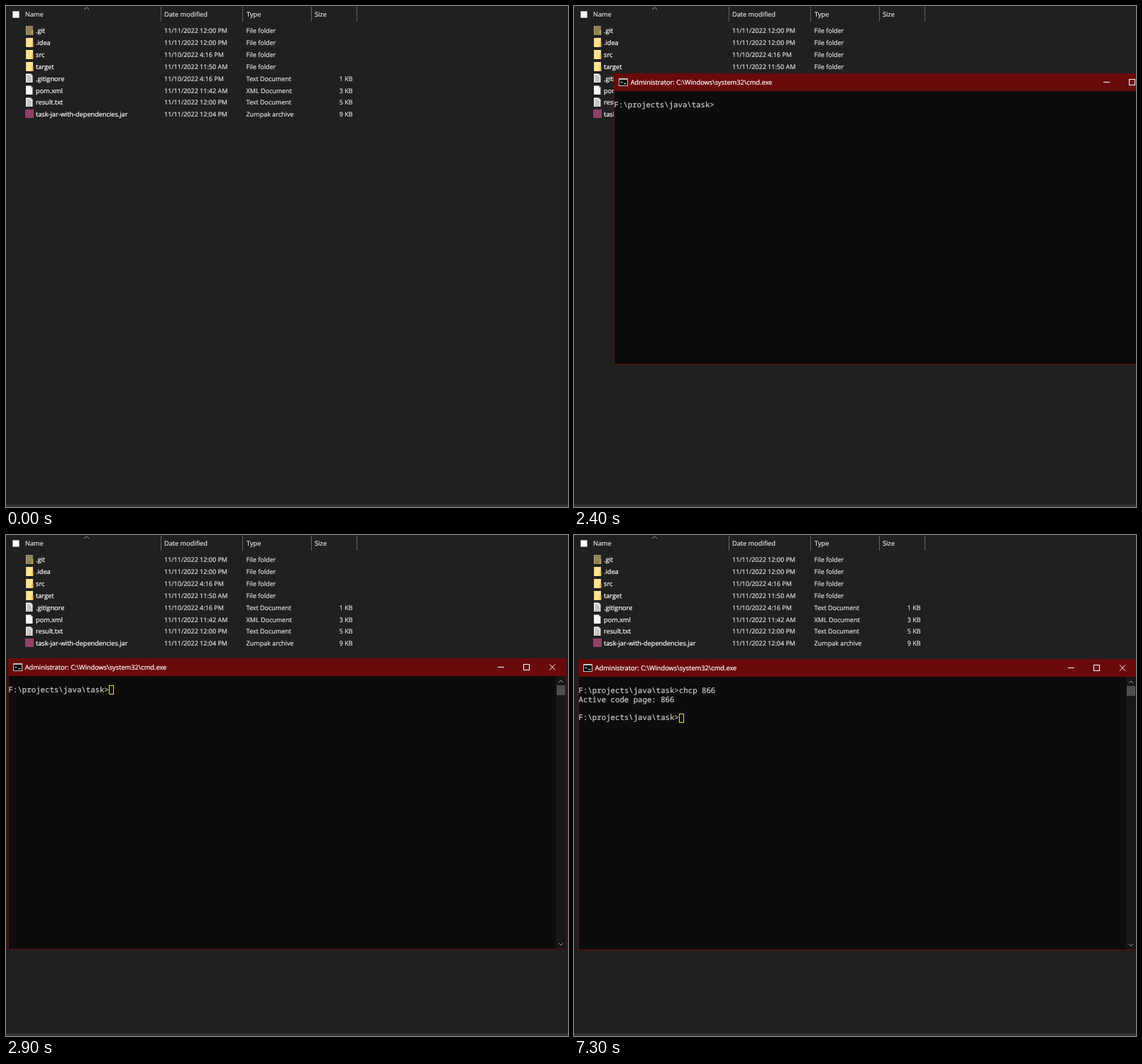
Animation of 792 by 707 pixels, one loop 8000 ms. Source, as an HTML page with a canvas:

```html
<!DOCTYPE html>
<html lang="en">
<head>
<meta charset="utf-8">
<title>Console over a file list</title>
<style>
  html, body { margin: 0; width: 100%; height: 100%; overflow: hidden; background: #202020; }
  canvas { display: block; }
</style>
</head>
<body>
<canvas id="stage" width="792" height="707"></canvas>
<script>
const ctx = document.getElementById('stage').getContext('2d');
const LOOP = 8000;
const UI = '"Open Sans", "Noto Sans", sans-serif';
const MONO = '"Noto Sans Mono", "DejaVu Sans Mono", monospace';
const CELL_W = 6.43, CELL_H = 12.86;
const PROMPT = 'F:\\projects\\java\\task>';
const COMMAND = 'chcp 866';

const FILES = [
  ['.git', '11/11/2022 12:00 PM', 'File folder', '', 'hidden'],
  ['.idea', '11/11/2022 12:00 PM', 'File folder', '', 'folder'],
  ['src', '11/10/2022 4:16 PM', 'File folder', '', 'folder'],
  ['target', '11/11/2022 11:50 AM', 'File folder', '', 'folder'],
  ['.gitignore', '11/10/2022 4:16 PM', 'Text Document', '1 KB', 'text'],
  ['pom.xml', '11/11/2022 11:42 AM', 'XML Document', '3 KB', 'page'],
  ['result.txt', '11/11/2022 12:00 PM', 'Text Document', '5 KB', 'text'],
  ['task-jar-with-dependencies.jar', '11/11/2022 12:04 PM', 'Zumpak archive', '9 KB', 'archive']
];

// Console position: [time, x, y]
const MOVES = [
  [1500, 86, 65], [2400, 56, 95], [2500, 24, 131], [2600, 0, 161], [2700, 1, 169],
  [2800, 2, 173], [2900, 3, 174], [3100, 5, 175], [3200, 6, 175]
];
const KEY_TIMES = [4500, 4700, 4800, 5000, 5300, 6600, 6700, 6800];
const CURSOR_ON = [[1500, 2400], [2900, 3400], [3900, 4300], [5000, 5300],
                   [6300, 6600], [6900, 7200], [7300, LOOP]];

const within = (t, a, b) => t >= a && t < b;

function rect(x, y, w, h, color) {
  ctx.fillStyle = color;
  ctx.fillRect(x, y, w, h);
}

function frame(x, y, w, h, color) {
  ctx.strokeStyle = color;
  ctx.lineWidth = 1;
  ctx.strokeRect(x + 0.5, y + 0.5, w - 1, h - 1);
}

function path(points, color, fill) {
  ctx.beginPath();
  points.forEach(([x, y]) => ctx.lineTo(x, y));
  ctx.lineWidth = 1;
  if (fill) {
    ctx.fillStyle = color;
    ctx.fill();
  } else {
    ctx.strokeStyle = color;
    ctx.stroke();
  }
}

// The thin outline gives small text the weight of hinted screen type
function text(str, x, y, size, color, family = UI, align = 'left') {
  ctx.font = `${size}px ${family}`;
  ctx.textAlign = align;
  ctx.fillStyle = ctx.strokeStyle = color;
  ctx.lineWidth = 0.22;
  ctx.fillText(str, x, y);
  ctx.strokeText(str, x, y);
}

function checkbox(x, y) {
  rect(x + 0.4, y + 0.4, 9.2, 9.2, '#fff');
}

function folderIcon(y, dim) {
  ctx.globalAlpha = dim ? 0.5 : 1;
  rect(28, y - 7, 10, 13, '#ffe394');
  rect(28, y - 7, 1, 13, '#f3cd68');
  rect(36, y - 1, 2.5, 7, '#e9bd55');
  ctx.globalAlpha = 1;
}

function pageIcon(y, lined) {
  path([[28, y - 6.5], [35, y - 6.5], [37.5, y - 4], [37.5, y + 6], [28, y + 6]], '#f4f4f4', true);
  path([[35, y - 6.5], [35, y - 4], [37.5, y - 4]], '#a8a8a8', true);
  if (lined) {
    for (let i = 0; i < 5; i++) rect(29.5, y - 4 + i * 2, i ? 6.5 : 4.5, 0.9, '#8c8c8c');
  }
}

function icon(kind, y) {
  if (kind === 'hidden' || kind === 'folder') folderIcon(y, kind === 'hidden');
  else if (kind === 'archive') rect(27, y - 7, 12, 12, '#8f4268');
  else pageIcon(y, kind === 'text');
}

function explorer(t) {
  rect(0, 0, 792, 707, '#202020');
  rect(0, 703, 792, 4, '#333133');
  checkbox(9, 7);
  path([[110, 5], [113.5, 2], [117, 5]], '#a6a6a6');
  [218, 333, 430, 494].forEach(x => rect(x, 1, 1, 21, '#636363'));
  [['Name', 27], ['Date modified', 223], ['Type', 339], ['Size', 435]]
    .forEach(([label, x]) => text(label, x, 15.3, 9.2, '#dedede'));

  if (within(t, 200, 1500)) {
    rect(11, 127, 481, 18, '#4d4d4d');
    checkbox(12, 131);
  }
  FILES.forEach(([name, date, type, size, kind], i) => {
    const y = 35 + i * 16.86;
    icon(kind, Math.round(y));
    text(name, 42, y + 3.3, 9.2, '#fff');
    text(date, 223, y + 3.3, 9, '#dedede');
    text(type, 338.6, y + 3.3, 9, '#dedede');
    text(size, 488.5, y + 3.3, 9, '#dedede', UI, 'right');
  });
}

function titleBar(title) {
  rect(0, 0, 787, 25, '#6a0a0b');
  rect(7, 7, 13, 11, '#c4c4c4');
  rect(8, 9, 11, 8, '#000');
  rect(9.5, 12, 3, 1.2, '#ddd');
  rect(14, 14, 3.5, 1.2, '#ddd');
  text(title, 23.7, 15.8, 9.27, '#fff');
  rect(690, 12, 9, 1, '#fff');
  frame(726, 8, 9, 9, '#fff');
  path([[763, 8.5], [771, 16.5]], '#fff');
  path([[771, 8.5], [763, 16.5]], '#fff');
}

function scrollBar() {
  rect(772, 25, 14, 385, '#171717');
  rect(773, 38, 12, 14, '#4d4d4d');
  path([[776, 34], [779, 31], [782, 34]], '#a0a0a0');
  path([[776, 402], [779, 405], [782, 402]], '#a0a0a0');
}

function consoleWindow(t) {
  const move = MOVES.filter(m => t >= m[0]).pop();
  if (!move) return;
  const selecting = within(t, 3600, 4500);
  const typed = KEY_TIMES.filter(k => t >= k).length;
  const done = t >= 7300;
  const lines = ['', PROMPT + COMMAND.slice(0, typed)];
  if (t >= 7200) lines.push('Active code page: 866');
  if (done) lines.push('', PROMPT);

  const cellX = col => 0.6 + col * CELL_W;
  const cellY = row => 25.2 + row * CELL_H;

  ctx.save();
  ctx.translate(move[1], move[2]);
  rect(0, 0, 787, 411, '#0c0c0c');
  frame(0, 0, 787, 411, '#640a0b');
  titleBar((selecting ? 'Select ' : '') + 'Administrator: C:\\Windows\\system32\\cmd.exe');
  scrollBar();
  lines.forEach((line, row) => text(line, cellX(0), cellY(row) + 9.8, 10.715, '#ccc', MONO));
  if (selecting) rect(283, 38, 7, 13, '#f2f2f2');
  if (CURSOR_ON.some(([a, b]) => within(t, a, b))) {
    const row = done ? 4 : 1;
    const col = PROMPT.length + (done ? 0 : typed);
    frame(Math.round(cellX(col)), Math.round(cellY(row)), 7, 13, '#e8e800');
  }
  ctx.restore();
}

function draw(now) {
  const t = (now - start) % LOOP;
  ctx.textRendering = 'geometricPrecision';
  explorer(t);
  consoleWindow(t);
  requestAnimationFrame(() => draw(performance.now()));
}

const start = performance.now();
draw(start);
</script>
</body>
</html>
```
